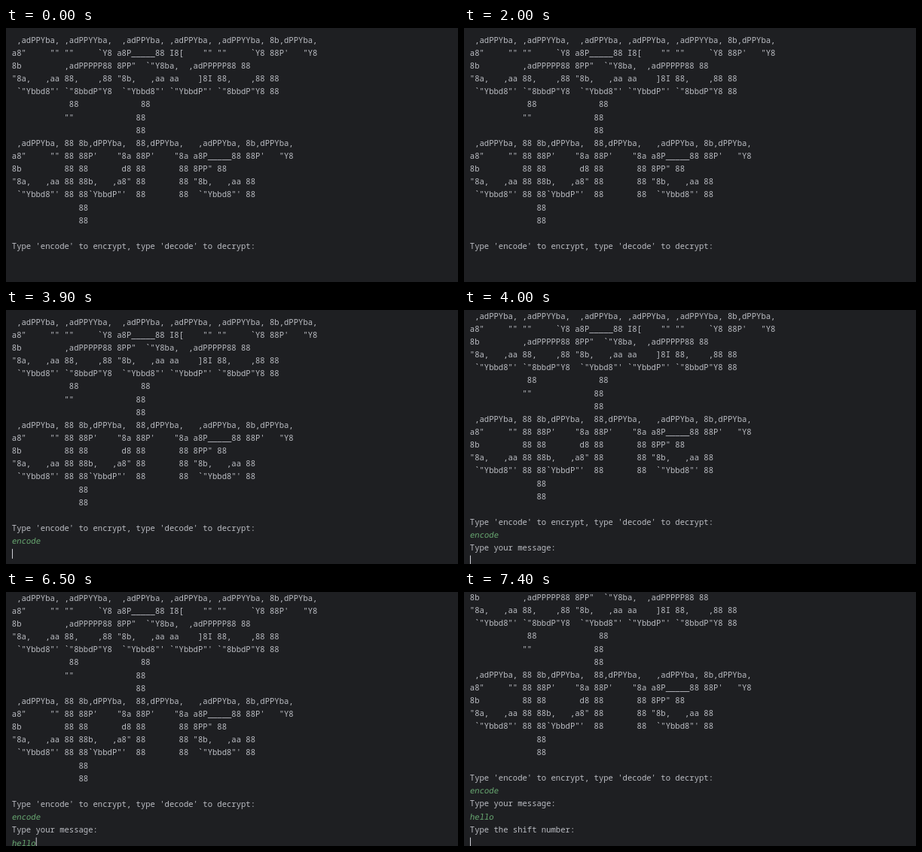
An HTML page that plays this animation: 600 px wide and 338 px high, repeating every 8 s.

```html
<!DOCTYPE html>
<html lang="en">
<head>
<meta charset="utf-8">
<title>Caesar cipher console</title>
<style>
  html, body { margin: 0; width: 100%; height: 100%; overflow: hidden; background: #1e1f22; }
  #stage { position: relative; width: 600px; height: 338px; overflow: hidden; }
  #console { position: absolute; left: 7.8px; top: 7.6px; }
  pre {
    margin: 0;
    font: 10.57px/17.16px "Noto Sans Mono", "DejaVu Sans Mono", monospace;
    font-variant-ligatures: none;
    color: #bcbec4;
  }
  .input { display: inline-block; color: #6aab73; transform: skewX(-9deg); }
  #caret {
    position: absolute; left: -.2px; top: 1.3px;
    width: 1.8px; height: 13.6px;
    background: #ced0d6;
  }
</style>
</head>
<body>
<div id="stage">
<div id="console">
<pre> ,adPPYba, ,adPPYYba,  ,adPPYba, ,adPPYba, ,adPPYYba, 8b,dPPYba,
a8"     "" ""     `Y8 a8P_____88 I8[    "" ""     `Y8 88P'   "Y8
8b         ,adPPPPP88 8PP"  `"Y8ba,  ,adPPPPP88 88
"8a,   ,aa 88,    ,88 "8b,   ,aa aa    ]8I 88,    ,88 88
 `"Ybbd8"' `"8bbdP"Y8  `"Ybbd8"' `"YbbdP"' `"8bbdP"Y8 88
            88             88
           ""             88
                          88
 ,adPPYba, 88 8b,dPPYba,  88,dPPYba,   ,adPPYba, 8b,dPPYba,
a8"     "" 88 88P'    "8a 88P'    "8a a8P_____88 88P'   "Y8
8b         88 88       d8 88       88 8PP" 88
"8a,   ,aa 88 88b,   ,a8" 88       88 "8b,   ,aa 88
 `"Ybbd8"' 88 88`YbbdP"'  88       88  `"Ybbd8"' 88
              88
              88

Type 'encode' to encrypt, type 'decode' to decrypt:
<span class="input" id="mode"></span>
<span id="askMessage"></span>
<span class="input" id="message"></span>
<span id="askShift"></span>
</pre>
<div id="caret"></div>
</div>
</div>
<script>
const LOOP = 8000, ROW = 17.16, COL = 10.57 * 0.6;
const el = id => document.getElementById(id);

// [time, characters typed]
const modeKeys = [[2100, 2], [2400, 3], [2700, 4], [3000, 6]];
const messageKeys = [[5900, 1], [6000, 2], [6100, 3], [6300, 4], [6500, 5]];
// [time, caret row, scroll offset]
const views = [[0, 17, 0], [3900, 18, 0], [4000, 19, 8.4], [7200, 21, 42.7]];

const latest = (steps, t) => steps.filter(s => s[0] <= t).pop();
const typed = (word, keys, t) => word.slice(0, (latest(keys, t) || [0, 0])[1]);
const place = (node, x, y) => node.style.transform = `translate(${x}px, ${y}px)`;

function draw(t) {
  const mode = typed("encode", modeKeys, t);
  const message = typed("hello", messageKeys, t);
  const [, row, scroll] = latest(views, t);
  const column = row === 17 ? mode.length : row === 19 ? message.length : 0;

  el("mode").textContent = mode;
  el("askMessage").textContent = t >= 4000 ? "Type your message:" : "";
  el("message").textContent = message;
  el("askShift").textContent = t >= 7200 ? "Type the shift number:" : "";

  place(el("console"), 0, -scroll);
  place(el("caret"), column * COL, row * ROW);
  el("caret").style.visibility = t < 2100 ? "hidden" : "visible";
}

const start = performance.now();
function tick() {
  draw((performance.now() - start) % LOOP);
  requestAnimationFrame(tick);
}
tick();
</script>
</body>
</html>
```
